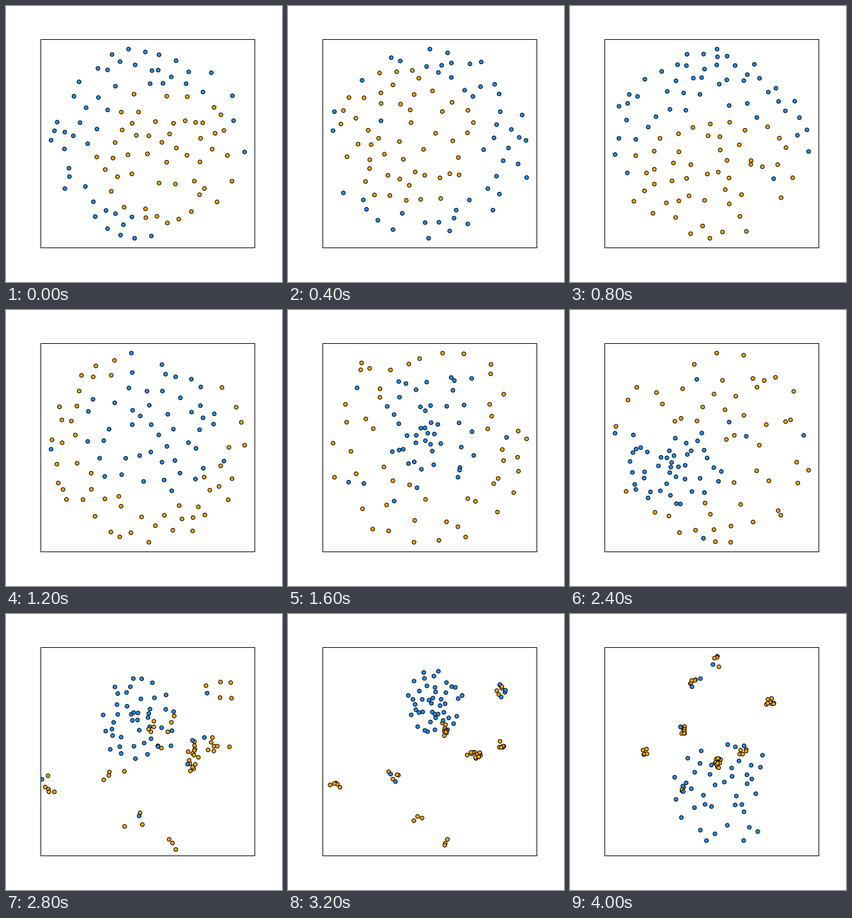
Write a matplotlib script that moves like this. It is 432 px wide and 432 px high and loops after 4400 ms.

```python
import numpy as np
import matplotlib.pyplot as plt
from matplotlib.animation import FuncAnimation

SIZE, DPI = 432, 72
PER_CLASS = 50
BLUE, ORANGE = "dodgerblue", "orange"
DISC = (221.5, 215), (152, 148)
LOW, HIGH = np.array([70, 67]), np.array([373, 363])

rng = np.random.default_rng(12)


def inside(point, center, radii):
    return np.sum(((point - center) / np.array(radii)) ** 2) <= 1


def draw_in(center, radii, power=0.5):
    """Random point in an ellipse; a higher power crowds the middle."""
    angle, r = rng.uniform(0, 2 * np.pi), rng.random() ** power
    return np.array(center) + r * np.array(radii) * (np.cos(angle), np.sin(angle))


def draw_where(accept, draw):
    point = draw()
    while not accept(point):
        point = draw()
    return point


def spread(n, draw, tries, taken=()):
    """Best-candidate sampling: evenly spaced but irregular points."""
    points = list(taken)
    while len(points) < n + len(taken):
        options = [draw() for _ in range(tries)]
        gaps = [min((np.hypot(*(p - q)) for q in points), default=0) for p in options]
        points.append(options[int(np.argmax(gaps))])
    return points[len(taken):]


def shuffled(blue, orange):
    points = np.array(blue + orange)
    colors = np.array([BLUE] * len(blue) + [ORANGE] * len(orange))
    order = rng.permutation(len(points))
    return points[order], colors[order]


def cloud(center, radii, core, strays, tries=4, power=0.5):
    """One class fills an ellipse, the other the rest of the round cloud."""
    inner = spread(PER_CLASS - strays * (core == BLUE), lambda: draw_where(
        lambda p: inside(p, *DISC), lambda: draw_in(center, radii, power)), tries)
    outer = spread(PER_CLASS - strays * (core == ORANGE), lambda: draw_where(
        lambda p: not inside(p, center, radii), lambda: draw_in(*DISC)), tries, inner)
    roaming = spread(strays, lambda: draw_in(*DISC), tries, inner + outer)
    if core == BLUE:
        points, colors = shuffled(inner + roaming, outer)
    else:
        points, colors = shuffled(outer + roaming, inner)
    lo, hi = points.min(axis=0), points.max(axis=0)
    return LOW + (points - lo) / (hi - lo) * (HIGH - LOW), colors


def knots(center, radii, strays, seats, looseness):
    """Orange gathers in knots of falling size, blue in a core with strays."""
    shares = np.cumsum(1 / np.arange(2, len(seats) + 2))
    owners = np.searchsorted(shares / shares[-1], (np.arange(PER_CLASS) + 0.5) / PER_CLASS)
    sizes = looseness * rng.uniform(0.4, 1.5, (len(seats), 2))
    orange = [draw_in(seats[k], sizes[k]) for k in owners]
    blue = spread(PER_CLASS - strays, lambda: draw_in(center, radii, 0.7), 3)
    joined = rng.integers(len(seats), size=strays)
    blue += [draw_in(seats[k], sizes[k] + 4) for k in joined]
    return shuffled(blue, orange)


# Knot centres, largest first
EARLY = [(292, 222), (243, 180), (333, 203), (73, 265),
         (333, 119), (165, 252), (205, 322), (249, 361)]
LATE = [(231, 233), (312, 135), (177, 180), (271, 218),
        (195, 105), (120, 215), (175, 271), (231, 74)]

steps = [
    cloud((254, 232), (111, 108), ORANGE, 2),
    cloud((186, 205), (106, 110), ORANGE, 1),
    cloud((236, 272), (138, 100), ORANGE, 3),
    cloud((228, 190), (106, 102), BLUE, 3),
    cloud((228, 190), (72, 88), BLUE, 7, tries=2, power=0.8),
    cloud((190, 215), (82, 75), BLUE, 6, tries=2, power=0.8),
    cloud((155, 245), (86, 60), BLUE, 7, tries=2, power=0.8),
    knots((205, 165), (62, 65), 8, EARLY, looseness=22),
    knots((230, 135), (46, 56), 6, EARLY, looseness=10),
    knots((236, 235), (70, 90), 9, LATE, looseness=17),
    knots((242, 278), (85, 82), 11, LATE, looseness=8),
]

fig = plt.figure(figsize=(SIZE / DPI, SIZE / DPI), dpi=DPI, facecolor="white")
ax = fig.add_axes([0.125, 0.125, 0.775, 0.755])
ax.set(xlim=(54, 388.8), ylim=(378, 51.84), xticks=[], yticks=[])
for spine in ax.spines.values():
    spine.set_linewidth(1)
dots = ax.scatter(*steps[0][0].T, s=36, c=steps[0][1], edgecolors="black", linewidths=1)


def update(i):
    points, colors = steps[i]
    dots.set_offsets(points + 0.5)
    dots.set_facecolor(colors)
    return (dots,)


anim = FuncAnimation(fig, update, frames=len(steps), interval=400, repeat=True)
plt.show()
```
